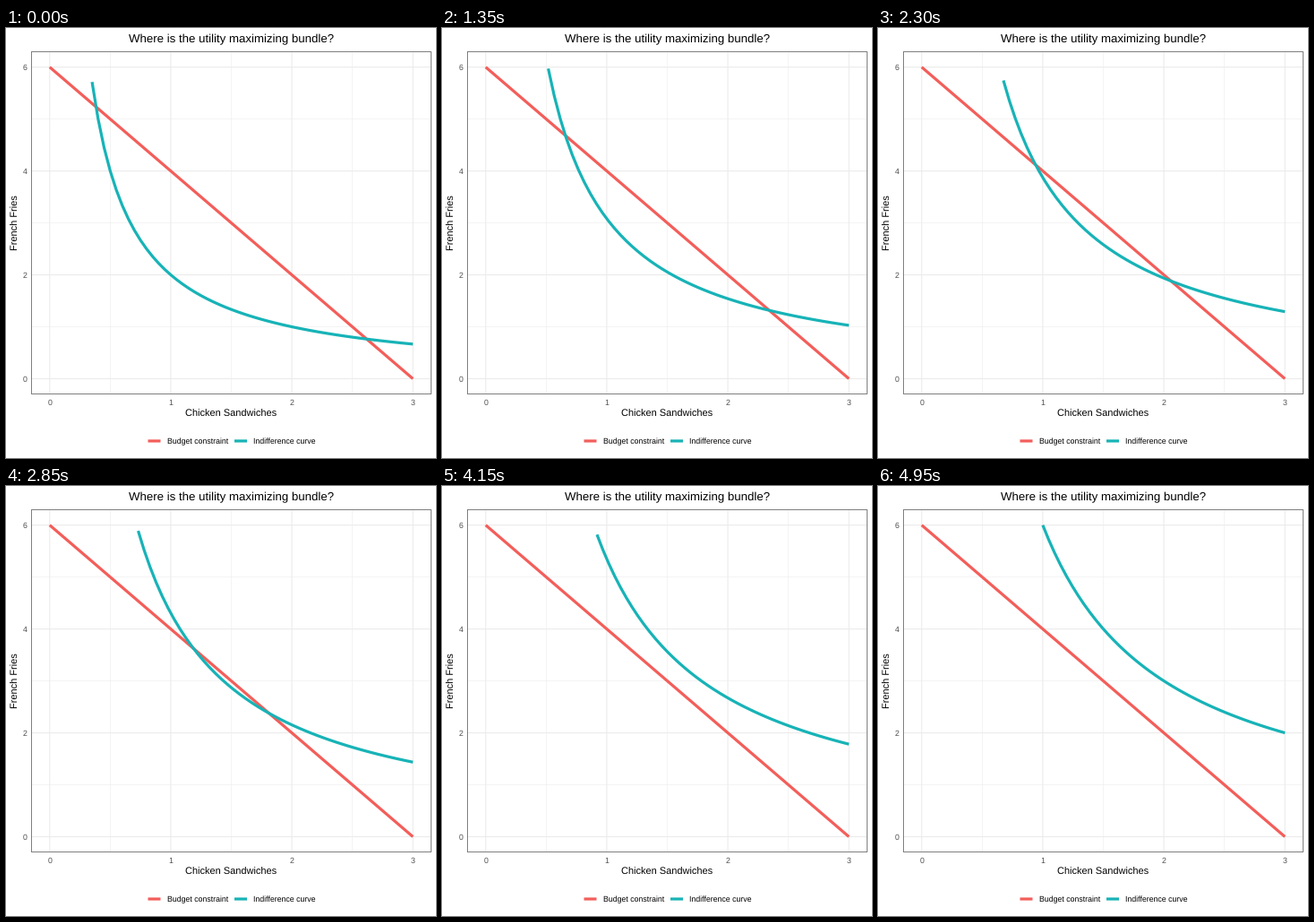
Recreate the animation shown at these times as a matplotlib script. Size 480 px wide and 480 px high, loop 5000 ms.

```python
import numpy as np
import matplotlib.pyplot as plt
from matplotlib.animation import FuncAnimation

plt.rcParams["font.family"] = "Liberation Sans"
plt.rcParams["text.hinting"] = "none"

SIZE, DPI = 480, 72
FRAMES, INTERVAL = 100, 50
RED, TEAL = "#F35E5A", "#17B3B7"
GRID, BORDER, TICK_TEXT = "#EBEBEB", "#7F7F7F", "#4D4D4D"
LEFT, RIGHT, TOP, BOTTOM = 28.5, 474.5, 26.5, 408.5
STEP = 0.05

fig = plt.figure(figsize=(SIZE / DPI, SIZE / DPI), dpi=DPI, facecolor="white")
ax = fig.add_axes([0, 0, 1, 1])
ax.set_xlim(0, SIZE)
ax.set_ylim(SIZE, 0)
ax.axis("off")


def px(x):
    # The range 0..3 is padded by 5 % on both sides.
    return LEFT + (RIGHT - LEFT) * (np.asarray(x) + 0.15) / 3.3


def py(y):
    return 391.5 - 57.97 * np.asarray(y)


def stroke(xs, ys, color, width, z=2, cap="butt"):
    line, = ax.plot(xs, ys, color=color, lw=width, zorder=z, snap=False,
                    solid_capstyle=cap, solid_joinstyle="round")
    return line


def label(x, y, text, size, color="black", ha="center", **kw):
    ax.text(x, y, text, fontsize=size, color=color, ha=ha,
            va="baseline", **kw)


def draw_grid(xs, ys, width):
    for x in px(xs):
        stroke([x, x], [TOP, BOTTOM], GRID, width, 1)
    for y in py(ys):
        stroke([LEFT, RIGHT], [y, y], GRID, width, 1)


draw_grid([0.5, 1.5, 2.5], [1, 3, 5], 0.53)
draw_grid([0, 1, 2, 3], [0, 2, 4, 6], 1.07)
for x in (LEFT, RIGHT):
    stroke([x, x], [TOP, BOTTOM], BORDER, 1, 4, "projecting")
for y in (TOP, BOTTOM):
    stroke([LEFT, RIGHT], [y, y], BORDER, 1, 4, "projecting")

for v in (0, 1, 2, 3):
    label(px(v), 421, str(v), 8.8, TICK_TEXT)
for v in (0, 2, 4, 6):
    label(23.6, py(v) + 3.2, str(v), 8.8, TICK_TEXT, ha="right")

label(251.5, 16.3, "Where is the utility maximizing bundle?", 13.2)
label(251.5, 433.8, "Chicken Sandwiches", 11)
label(13.4, 217.2, "French Fries", 11, rotation=90, rotation_mode="anchor")

for x, color, name in ((158.5, RED, "Budget constraint"),
                       (255, TEAL, "Indifference curve")):
    stroke([x, x + 14], [461, 461], color, 3.2)
    label(x + 21, 464, name, 8.8, ha="left")

stroke(px([0, 3]), py([6, 0]), RED, 3.2)
curve = stroke([], [], TEAL, 3.2, 3)

# Utility levels and the frames at which each one is reached.
levels = np.linspace(2, 6, 9)
keys = np.round(np.linspace(1, FRAMES, len(levels))) - 1


def level_path(k):
    """Sampled curve y = k / x, cut off above y = 6."""
    first = int(np.ceil(k / 6 / STEP - 1e-9))
    x = np.arange(first, 61) * STEP
    return np.array([x, k / x])


def resample(path, n):
    old = np.linspace(0, 1, path.shape[1])
    new = np.linspace(0, 1, n)
    return np.array([np.interp(new, old, row) for row in path])


paths = [level_path(k) for k in levels]


def update(frame):
    i = min(int(np.searchsorted(keys, frame, side="right")) - 1,
            len(keys) - 2)
    t = (frame - keys[i]) / (keys[i + 1] - keys[i])
    a, b = paths[i], paths[i + 1]
    n = max(a.shape[1], b.shape[1])
    x, y = (1 - t) * resample(a, n) + t * resample(b, n)
    curve.set_data(px(x), py(y))
    return curve,


anim = FuncAnimation(fig, update, frames=FRAMES, interval=INTERVAL,
                     repeat=True, repeat_delay=0, blit=False)
plt.show()
```
